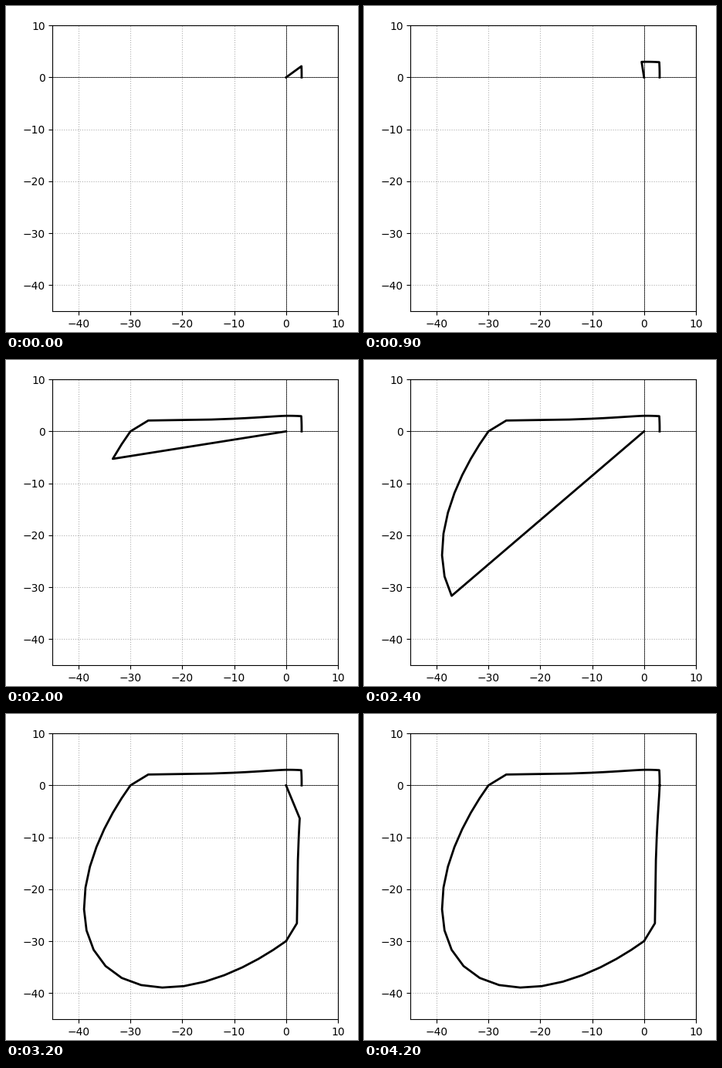
A matplotlib script for the animation above (4700 ms loop, 456 by 422 pixels).

```python
import numpy as np
import matplotlib.pyplot as plt
from matplotlib.animation import FuncAnimation

W, H, DPI = 456, 422, 100
LEFT, TOP, SIDE = 60.4, 25.2, 369.6

FC, FT = 30.0, 3.0              # compressive and tensile strength
A, B, C, D = 2.0108, 0.9955, 9.113, 0.2451
N = 80                          # directions around the full turn
FRAMES, LAST = 47, 42


def same_sign(angle):
    """Strength point where both stresses share a sign."""
    x, y = np.cos(angle), np.sin(angle)
    j2 = (x * x - x * y + y * y) / 3
    a = A * j2
    b = B * np.sqrt(j2) + C * max(x, y, 0) + D * (x + y)
    r = FC * (-b + np.sqrt(b * b + 4 * a)) / (2 * a)
    return r * x, r * y


# tension that remains under a growing compression
press = np.linspace(0.01, FC, 6000)
pull = 2.05 + (FT - 2.05) * np.exp(-(press / 11) ** 1.3)
slope = np.arctan2(pull, press)


def mixed_sign(angle):
    """Strength point with compression along x and tension along y."""
    p = np.interp(np.pi - angle, slope[::-1], press[::-1])
    return -p, p * np.tan(np.pi - angle)


def envelope(k):
    angle = 2 * np.pi * k / N
    if 20 < k < 40:
        return mixed_sign(angle)
    if 60 < k < N:
        return envelope(100 - k)[::-1]
    return same_sign(angle)


points = np.array([envelope(k) for k in range(N + 1)])

# uneven pace of the sweep: time step -> direction reached
STEPS = [0, 6, 9, 12, 18, 20, 24, 28, 30, 32, 35, 36, 42]
REACHED = [8, 18, 22, 28, 38, 42, 49, 56, 59, 65, 69, 69, 80]

# the small surplus keeps the pixel size from rounding down
fig = plt.figure(figsize=((W + 0.01) / DPI, (H + 0.01) / DPI), dpi=DPI,
                 facecolor="white")
ax = fig.add_axes([LEFT / W, 1 - (TOP + SIDE) / H, SIDE / W, SIDE / H])
ax.set(xlim=(-45, 10), ylim=(-45, 10),
       xticks=range(-40, 11, 10), yticks=range(-40, 11, 10))
ax.grid(linestyle=":")
ax.axhline(0, color="black", lw=0.5)
ax.axvline(0, color="black", lw=0.5)
curve, = ax.plot([], [], color="black", lw=2)


def draw(frame):
    k = int(round(np.interp(min(frame, LAST), STEPS, REACHED)))
    path = points[:k + 1]
    if k < N:
        path = np.vstack([path, (0, 0)])
    curve.set_data(path[:, 0], path[:, 1])
    return curve,


anim = FuncAnimation(fig, draw, frames=FRAMES, interval=100,
                     repeat=True, repeat_delay=0)
plt.show()
```
